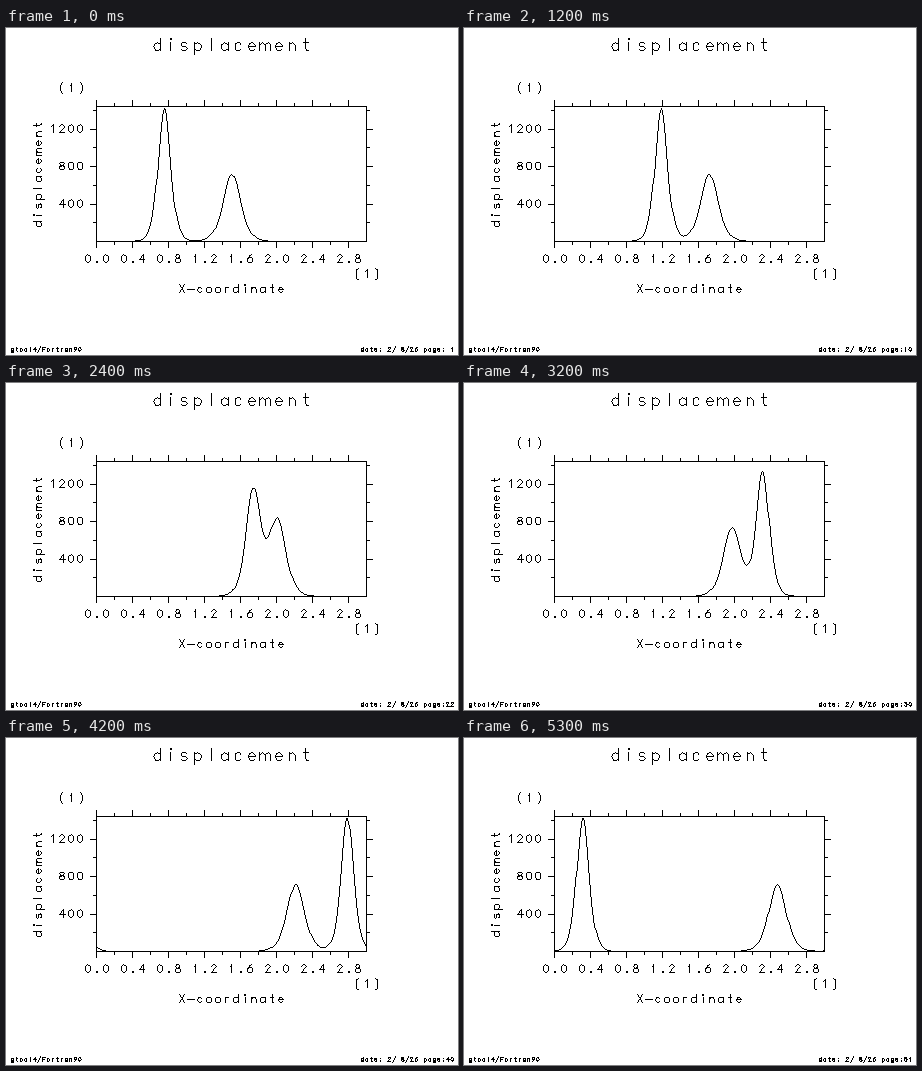
Animation, 452 px wide and 327 px high, one loop 5.8 s. Source, as a matplotlib script:

```python
import numpy as np
import matplotlib.pyplot as plt
from matplotlib.animation import FuncAnimation

W, H, DPI = 452, 327, 64
LEFT, RIGHT, TOP, BOTTOM = 90.4, 359.6, 78, 213
X_SCALE, Y_SCALE = 90, 135 / 1440   # pixels per data unit


# --- Single-stroke lettering: baseline 0, x-height 14, capitals 21, pitch 24 ---

def line(*xy):
    return np.array(xy, float).reshape(-1, 2)


def arc(cx, cy, rx, ry, start=0, end=360):
    a = np.radians(np.linspace(start, end, round(abs(end - start) / 30) + 1))
    return np.column_stack([cx + rx * np.cos(a), cy + ry * np.sin(a)])


def dot(y):
    return arc(0, y, 1, 1)


BOWL = arc(0, 7, 6.5, 7, 25, 335)

GLYPHS = {
    " ": [],
    "a": [BOWL, line(6, 14, 6, 0)],
    "c": [arc(0, 7, 6, 7, 38, 322)],
    "d": [BOWL, line(6, 21, 6, 0)],
    "e": [line(-6, 8, 6, 8), arc(0, 7, 6, 7, 8, 320)],
    "g": [BOWL, line(6, 14, 6, -2), arc(0, -2, 6, 5, 0, -145)],
    "i": [line(0, 14, 0, 0), dot(20)],
    "l": [line(0, 21, 0, 0)],
    "m": [line(-10, 14, -10, 0), arc(-5, 9, 5, 5, 180, 0), line(0, 9, 0, 0),
          arc(5, 9, 5, 5, 180, 0), line(10, 9, 10, 0)],
    "n": [line(-5.5, 14, -5.5, 0), arc(0, 9, 5.5, 5, 180, 0),
          line(5.5, 9, 5.5, 0)],
    "o": [arc(0, 7, 6.3, 7)],
    "p": [line(-6, 14, -6, -7), arc(0, 7, 6.5, 7, 155, -155)],
    "r": [line(-4, 14, -4, 0), arc(2, 8, 6, 6, 180, 80)],
    "s": [arc(0, 10.5, 5.5, 3.5, 30, 270), arc(0, 3.5, 5.5, 3.5, 90, -150)],
    "t": [line(0, 21, 0, 4), arc(4, 4, 4, 4, 180, 270), line(-4, 14, 4, 14)],
    "F": [line(-6, 0, -6, 21, 7, 21), line(-6, 11, 2, 11)],
    "X": [line(-7, 21, 7, 0), line(-7, 0, 7, 21)],
    "0": [arc(0, 10.5, 7, 10.5)],
    "1": [line(-4, 17, 0, 21, 0, 0)],
    "2": [arc(0, 15.5, 6, 5.5, 170, -25), line(5.4, 13.2, -7, 0, 7, 0)],
    "3": [line(-5, 21, 6, 21, 0, 13), arc(0, 6.5, 7, 6.5, 90, -150)],
    "4": [line(3, 0, 3, 21, -7, 7, 8, 7)],
    "5": [line(5, 21, -5, 21, -6, 12), arc(0, 7, 7, 7, 140, -150)],
    "6": [arc(0, 6.5, 6.5, 6.5), arc(6, 6.5, 12.5, 14.5, 180, 95)],
    "7": [line(-7, 21, 7, 21, -3, 0)],
    "8": [arc(0, 16, 5.5, 5), arc(0, 5.5, 7, 5.5)],
    "9": [arc(0, 14.5, 6.5, 6.5), arc(-6, 14.5, 12.5, 14.5, 0, -85)],
    ".": [dot(1)],
    ":": [dot(13), dot(1)],
    "-": [line(-9, 9, 9, 9)],
    "/": [line(-9, -7, 9, 25)],
    "(": [arc(3, 9, 8, 16, 110, 250)],
    ")": [arc(-3, 9, 8, 16, 70, -70)],
}


def lettering(text, x, y, pitch, align=0.5, vertical=False):
    """Strokes of a text; align 0, 0.5, 1 puts its start, middle or end at x, y."""
    scale = pitch / 24
    strokes = []
    for i, char in enumerate(text):
        shift = (i + 0.5 - align * len(text)) * pitch
        for s in GLYPHS[char]:
            along, up = shift + s[:, 0] * scale, (s[:, 1] - 9) * scale
            if vertical:
                strokes.append(np.column_stack([x - up, y - along]))
            else:
                strokes.append(np.column_stack([x + along, y - up]))
    return strokes


def ink(canvas, strokes):
    """Draw strokes one pixel wide, without antialiasing."""
    for stroke in strokes:
        dots = np.floor(stroke + 0.5).astype(int)
        for a, b in zip(dots[:-1], dots[1:]):
            steps = np.linspace(0, 1, np.abs(b - a).max() + 1)[:, None]
            x, y = np.floor(a + steps * (b - a) + 0.5).astype(int).T
            canvas[y, x] = 0


# --- Two solitons of u_t + u u_x + u_xxx = 0 on a periodic interval ---

PERIOD, POINTS, STEP = 3.0, 256, 1e-4
K1, K2 = np.sqrt(120), np.sqrt(60)
START1, START2 = 0.75, 1.5
GAIN = 0.988
grid = np.arange(POINTS) * PERIOD / POINTS


def two_solitons(x, t):
    # 12 (ln F)'' is 12 times the variance of the slopes weighted by F's terms
    p1 = 2 * K1 * (x - START1 - 4 * K1**2 * t)
    p2 = 2 * K2 * (x - START2 - 4 * K2**2 * t)
    coupling = 2 * np.log((K1 - K2) / (K1 + K2))
    powers = np.array([0 * x, p1, p2 - coupling, p1 + p2])
    weights = np.exp(powers - powers.max(axis=0))
    weights /= weights.sum(axis=0)
    slopes = np.array([0, 2 * K1, 2 * K2, 2 * (K1 + K2)])
    mean = slopes @ weights
    return 12 * (weights * (slopes[:, None] - mean)**2).sum(axis=0)


def profile(t):
    return GAIN * sum(two_solitons(grid + n * PERIOD, t) for n in (-1, 0, 1))


# --- Fixed parts of the plot ---

def plot_frame():
    strokes = [line(LEFT, TOP, RIGHT, TOP, RIGHT, BOTTOM, LEFT, BOTTOM, LEFT, TOP)]
    for i in range(15):
        x = LEFT + 0.2 * i * X_SCALE
        size = 3 if i % 2 else 6
        strokes += [line(x, TOP, x, TOP - size), line(x, BOTTOM, x, BOTTOM + size)]
        if i % 2 == 0:
            strokes += lettering(f"{0.2 * i:.1f}", x, 230.5, 9)
    for i in range(1, 8):
        y = BOTTOM - 200 * i * Y_SCALE
        size = 3 if i % 2 else 6
        strokes += [line(LEFT, y, LEFT - size, y), line(RIGHT, y, RIGHT + size, y)]
        if i % 2 == 0:
            strokes += lettering(str(200 * i), 78, y, 9, align=1)
    return strokes


middle = (LEFT + RIGHT) / 2
background = np.ones((H, W))
ink(background, plot_frame())
ink(background, lettering("displacement", middle, 17, 13.5))
ink(background, lettering("X-coordinate", middle, 260.5, 9))
ink(background, lettering("displacement", 31.5, 146, 9, vertical=True))
ink(background, lettering("(1)", 65, 59.5, 9))
ink(background, lettering("(1)", 360.5, 245.5, 9))
ink(background, lettering("gtool4/Fortran90", 3.5, 321, 4.5, align=0))

fig = plt.figure(figsize=(W / DPI, H / DPI), dpi=DPI, facecolor="white")
ax = fig.add_axes([0, 0, 1, 1])
ax.axis("off")
picture = ax.imshow(background, cmap="gray", vmin=0, vmax=1,
                    interpolation="nearest", aspect="auto")


def update(n):
    page = min(max(n - 2, 1), 51)
    u = profile((page - 1) * STEP)
    canvas = background.copy()
    ink(canvas, [np.column_stack([LEFT + grid * X_SCALE, BOTTOM - u * Y_SCALE])])
    ink(canvas, lettering(f"date: 2/ 8/26 page:{page:2d}", 448, 321, 4.5, align=1))
    picture.set_data(canvas)
    return picture,


anim = FuncAnimation(fig, update, frames=58, interval=100,
                     repeat=True, repeat_delay=0, blit=False)
plt.show()
```
